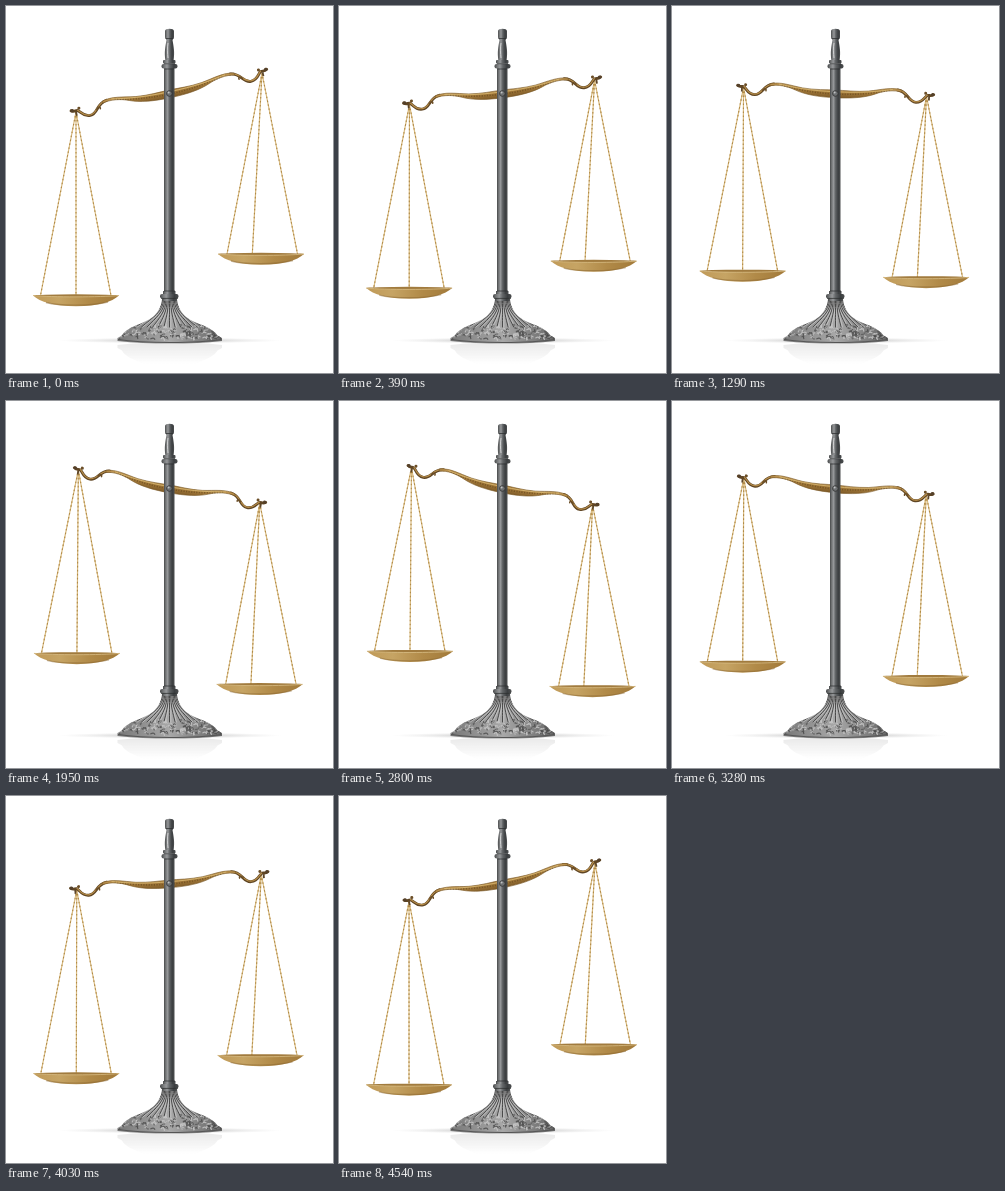
Write an HTML page that moves like this. It is 327 by 367 pixels and loops after 4.57 s.

```html
<!DOCTYPE html>
<html lang="en">
<head>
<meta charset="utf-8">
<title>Balance scale</title>
<style>
@property --p { syntax: "<number>"; inherits: true; initial-value: 0; }
html, body { margin: 0; width: 100%; height: 100%; overflow: hidden; background: #fff; }
svg { display: block; width: 327px; height: 367px; animation: tilt 4570ms infinite; }

/* --p runs from 0 (left side low) to 1 (right side low) in 30 ms steps */
@keyframes tilt {
  0% { --p: 0; animation-timing-function: steps(70, end); }
  45.952% { --p: 1; animation-timing-function: step-end; }
  61.269% { --p: 1; animation-timing-function: steps(59, jump-both); }
  100% { --p: 0; }
}
#beam {
  transform: translate(163.5px, 87px)
    rotate(calc((var(--p) * 24 - 12) * 1deg))
    scaleX(calc(1.02 - var(--p) * .03));
}
#left {
  transform: translate(calc(70px + var(--p) * 1px), calc(289.5px - var(--p) * 40px))
    skewX(calc(var(--p) * -.47deg));
}
#right {
  transform: translate(calc(255px - var(--p) * 1.5px), calc(248px + var(--p) * 38px))
    skewX(calc(var(--p) * .3deg));
}
.rope { fill: none; stroke: #d9bb80; stroke-width: 1.2; }
.twist { fill: none; stroke: #b08a48; stroke-width: 1.1; stroke-dasharray: 1.6 2.4; }
</style>
</head>
<body>
<svg viewBox="0 0 327 367">
  <defs>
    <linearGradient id="steel">
      <stop offset="0" stop-color="#47494a"/>
      <stop offset=".16" stop-color="#737576"/>
      <stop offset=".34" stop-color="#96989a"/>
      <stop offset=".52" stop-color="#626567"/>
      <stop offset=".78" stop-color="#3b3e40"/>
      <stop offset="1" stop-color="#4c4e4f"/>
    </linearGradient>
    <linearGradient id="bell">
      <stop offset="0" stop-color="#777"/>
      <stop offset=".3" stop-color="#969696"/>
      <stop offset=".5" stop-color="#a8a8a8"/>
      <stop offset=".75" stop-color="#858585"/>
      <stop offset="1" stop-color="#686868"/>
    </linearGradient>
    <linearGradient id="gold">
      <stop offset="0" stop-color="#c09a58"/>
      <stop offset=".3" stop-color="#c6a464"/>
      <stop offset=".65" stop-color="#b18a48"/>
      <stop offset="1" stop-color="#a27a3a"/>
    </linearGradient>
    <linearGradient id="bar" x2="0" y2="1">
      <stop offset="0" stop-color="#c39a55"/>
      <stop offset=".5" stop-color="#a47a3a"/>
      <stop offset="1" stop-color="#7d5a28"/>
    </linearGradient>
    <linearGradient id="fade" x2="0" y2="1">
      <stop offset="0" stop-color="#fff" stop-opacity=".12"/>
      <stop offset="1" stop-color="#fff" stop-opacity="0"/>
    </linearGradient>
    <radialGradient id="floor">
      <stop offset="0" stop-color="#777" stop-opacity=".5"/>
      <stop offset=".5" stop-color="#999" stop-opacity=".28"/>
      <stop offset="1" stop-color="#bbb" stop-opacity="0"/>
    </radialGradient>
    <mask id="mirror" maskUnits="userSpaceOnUse" x="90" y="336" width="150" height="22">
      <rect x="90" y="336" width="150" height="22" fill="url(#fade)"/>
    </mask>
    <path id="foot" d="M156 293C155 304 149 313 132 318.500C124 322 118 325 116 329.500L111.500 332V335C128 337 145 337.500 164 337.500S200 337 216 335V332L211.500 329.500C209 325 203 322 195 318.500C178 313 172 304 171 293Z"/>
    <clipPath id="footclip"><use href="#foot"/></clipPath>

    <g id="arm">
      <path d="M-98 -3C-95 -1 -94 -2.500 -92 -2C-89 -1 -88 5.500 -80.500 5.500C-72.500 5.500 -72.500 -5 -62 -6" fill="none" stroke="#604624" stroke-width="2.900" stroke-linecap="round"/>
      <path d="M-92 -2.500C-89 -1 -88 5 -80.500 5C-73 5 -72.500 -5 -62 -6.300" fill="none" stroke="#b68d4a" stroke-width="1.200"/>
      <path d="M-66 -6C-56 -9 -46 -5.500 -33 -3.500C-20 -2 -10 -3 1 -3V4.800C-18 4.800 -30 3 -40 -1C-48 -4.500 -58 -6 -66 -4Z" fill="url(#bar)" stroke="#7b5a28" stroke-width=".6"/>
      <path d="M-54 -5.500C-42 -2.500 -30 .5 0 1.200" fill="none" stroke="#5e431a" stroke-width="1.600" stroke-dasharray="1.300 1.300" opacity=".55"/>
      <path d="M-57 -6.300C-42 -3.500 -25 -1 0 -1.300" fill="none" stroke="#d9b974" stroke-width=".8"/>
      <path d="M-73 1C-71 -2 -69 -1 -69.500 1" fill="none" stroke="#6b4e27" stroke-width="1.500" stroke-linecap="round"/>
      <circle cx="-97" cy="-3" r="1.700" fill="#54402a"/>
      <circle cx="-90" cy="-4" r="1.500" fill="#6b4e27"/>
      <path d="M-93.500 -1V3" stroke="#5c4528" stroke-width="1.800"/>
    </g>

    <g id="pan">
      <path d="M-43 0C-36 6.500 -22 10.800 0 10.800S36 6.500 43 0Z" fill="url(#gold)"/>
      <path d="M-30 7C-16 10.600 16 10.600 32 6.500" fill="none" stroke="#8a6730" stroke-width="1.300" opacity=".5"/>
      <ellipse rx="43" ry="1.200" fill="#a17b3e"/>
      <path d="M-43 0C-25 1.800 25 1.800 43 0" fill="none" stroke="#d9bd85" stroke-width=".8"/>
    </g>
  </defs>

  <ellipse cx="164" cy="334.500" rx="112" ry="3" fill="url(#floor)"/>
  <g mask="url(#mirror)"><use href="#foot" fill="#444" transform="matrix(1 0 0 -1 0 674)"/></g>

  <g id="left"></g>
  <g id="right"></g>

  <g id="beam">
    <use href="#arm"/>
    <use href="#arm" transform="scale(-1 1)"/>
  </g>

  <use href="#foot" fill="url(#bell)"/>
  <g id="relief" clip-path="url(#footclip)" fill="none" stroke-linecap="round"></g>
  <path d="M112 333.500C128 336 145 336.500 164 336.500S200 336 215.500 333.500" fill="none" stroke="#555" stroke-width="1.200"/>

  <g fill="url(#steel)">
    <rect x="158" y="61" width="10.500" height="227"/>
    <path d="M159 31.500V25C159 22 168 22 168 25V31.500L166.500 34C167.500 40 169 46 167.500 55H159.500C158 46 159.500 40 160.500 34Z"/>
    <rect x="157" y="54" width="12.500" height="3.500" rx="1"/>
    <rect x="155.500" y="58" width="16" height="4.500" rx="2"/>
    <rect x="157" y="285" width="12.500" height="3"/>
    <rect x="154" y="288" width="18.500" height="4.500" rx="2"/>
    <rect x="156" y="292" width="15" height="3" rx="1"/>
  </g>
  <path d="M159.500 32.500H167.500M158 57.700H169M158.500 63H168M158 285H169M155 292.400H172" stroke="#2d2f30" opacity=".75"/>
  <path d="M162 37C161 42 161.500 48 162 52" fill="none" stroke="#d0d1d2"/>
  <circle cx="163.300" cy="87.500" r="2.800" fill="#6d7072" stroke="#333" stroke-width=".8"/>
  <circle cx="162.600" cy="86.600" r="1" fill="#c0c2c3"/>
</svg>

<script>
const add = (parent, tag, attrs) => {
  const el = document.createElementNS("http://www.w3.org/2000/svg", tag);
  for (const key in attrs) el.setAttribute(key, attrs[key]);
  parent.append(el);
};

function hang(id, topX, topY, feet) {
  const group = document.getElementById(id);
  const d = feet.map(x => `M${topX} ${topY}L${x} 0`).join("");
  add(group, "path", { class: "rope", d });
  add(group, "path", { class: "twist", d });
  add(group, "use", { href: "#pan" });
}
hang("left", 0, -183.5, [-35.5, 0, 35]);
hang("right", 1, -181, [-34, -8.7, 36.5]);

// Fluted bell and cast leaves on the foot
const relief = document.getElementById("relief");
for (let i = -6; i <= 6; i++) {
  const top = 163.5 + i * 1.2, low = 163.5 + i * 5.6;
  const d = `M${top} 294C${top} 305 ${(top + low) / 2} 312 ${low} 321`;
  add(relief, "path", { d, stroke: "#4a4a4a", "stroke-width": 1 });
  add(relief, "path", { d, stroke: "#d0d0d0", "stroke-width": .7, transform: "translate(1.3 0)" });
}
let seed = 7;
const rnd = () => (seed = seed * 16807 % 2147483647) / 2147483647;
for (let i = 0; i < 190; i++) {
  const x = 113 + rnd() * 102, y = 319 + rnd() * 14;
  const dx = rnd() * 6 - 3, dy = rnd() * 4 - 2;
  add(relief, "path", {
    d: `M${x} ${y}q${dx} ${-dy - 1} ${dx + 1} ${dy}`,
    stroke: i % 2 ? "#4a4a4a" : "#c9c9c9",
    "stroke-width": .7 + rnd() * .6,
    opacity: .8
  });
}
</script>
</body>
</html>
```
